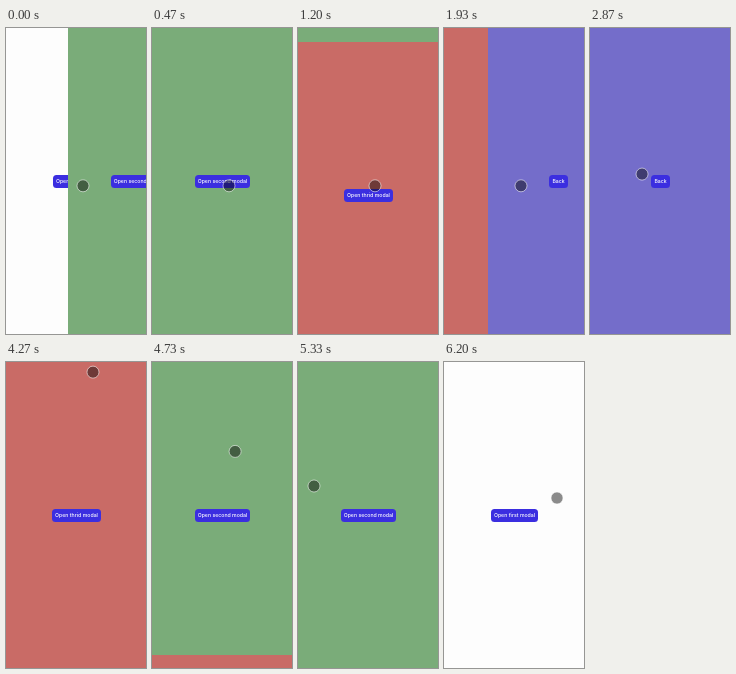
Recreate the animation shown at these times as an HTML page. Size 140 px wide and 306 px high, loop 7070 ms.

```html
<!DOCTYPE html>
<html lang="en">
<head>
<meta charset="utf-8">
<title>Stacked modals</title>
<style>
html, body { margin: 0; width: 100%; height: 100%; overflow: hidden; background: #fdfdfd; }
svg { display: block; width: 100vw; height: 100vh; }
text { font: 500 5.2px Inter, "Liberation Sans", sans-serif; fill: #fff; text-anchor: middle; }
</style>
</head>
<body>
<svg id="stage" viewBox="0 0 140 306"></svg>
<script>
const LOOP = 7070, FPS = 15, W = 140, H = 306;
const stage = document.getElementById('stage');

// Finger moves; the swipes also carry a modal away
const toLeftEdge = { from: 2400, to: 3133, x: 22, y: 132 };
const swipeRight = { from: 3150, to: 3533, x: 73, y: 156 };
const toTop = { from: 3610, to: 4267, x: 87, y: 10 };
const swipeDown = { from: 4430, to: 4780, x: 82, y: 112 };
const backToEdge = { from: 4780, to: 5133, x: 16, y: 124 };
const settle = { from: 5333, to: 5533, x: 9, y: 125 };
const lastSwipe = { from: 5760, to: 6200, x: 113, y: 136 };
const gestures = [toLeftEdge, swipeRight, toTop, swipeDown, backToEdge, settle, lastSwipe];

const slide = (from, duration = 335) => ({ from, to: from + duration });
const screens = [
  { color: '#fdfdfd', label: 'Open first modal', width: 47 },
  { color: '#7aac79', label: 'Open second modal', width: 55, dx: W, dy: 0, open: slide(-250, 480), close: lastSwipe },
  { color: '#c96b66', label: 'Open thrid modal', width: 49, dx: 0, dy: H, open: slide(940), close: swipeDown },
  { color: '#746dca', label: 'Back', width: 19, dx: W, dy: 0, open: slide(1741.5), close: swipeRight }
];

stage.innerHTML = screens.map(s => `<g>
  <rect width="${W}" height="${H}" fill="${s.color}"/>
  <rect x="${70.5 - s.width / 2}" y="147" width="${s.width}" height="13" rx="3.5" fill="#3b2ee0"/>
  <text x="70.5" y="155.3">${s.label}</text></g>`).join('') +
  '<circle r="6" fill="#000" fill-opacity=".45" stroke="#fff" stroke-opacity=".55"/>';
const groups = stage.querySelectorAll('g');
const touch = stage.querySelector('circle');

const cubic = p => p < .5 ? 4 * p ** 3 : 1 - 4 * (1 - p) ** 3;
const sine = p => (1 - Math.cos(Math.PI * p)) / 2;
const speedUp = p => p ** 1.75;
const progress = (t, { from, to }) => Math.min(1, Math.max(0, (t - from) / (to - from)));
const move = (el, x, y) => el.setAttribute('transform', `translate(${x} ${y})`);

function draw(now) {
  // the screen updates 15 times per second
  const t = Math.floor((now % LOOP) * FPS / 1000 + .1) * 1000 / FPS;
  screens.forEach((s, i) => {
    if (!s.open) return;
    const away = 1 - cubic(progress(t, s.open)) + sine(progress(t, s.close));
    move(groups[i], Math.round(s.dx * away), Math.round(s.dy * away));
  });
  let x = 77, y = 157.8;
  for (const g of gestures) {
    const k = speedUp(progress(t, g));
    x += (g.x - x) * k;
    y += (g.y - y) * k;
  }
  move(touch, x, y);
}

let start;
function frame(now) {
  start ??= now;
  draw(now - start);
  requestAnimationFrame(frame);
}
draw(0);
requestAnimationFrame(frame);
</script>
</body>
</html>
```
